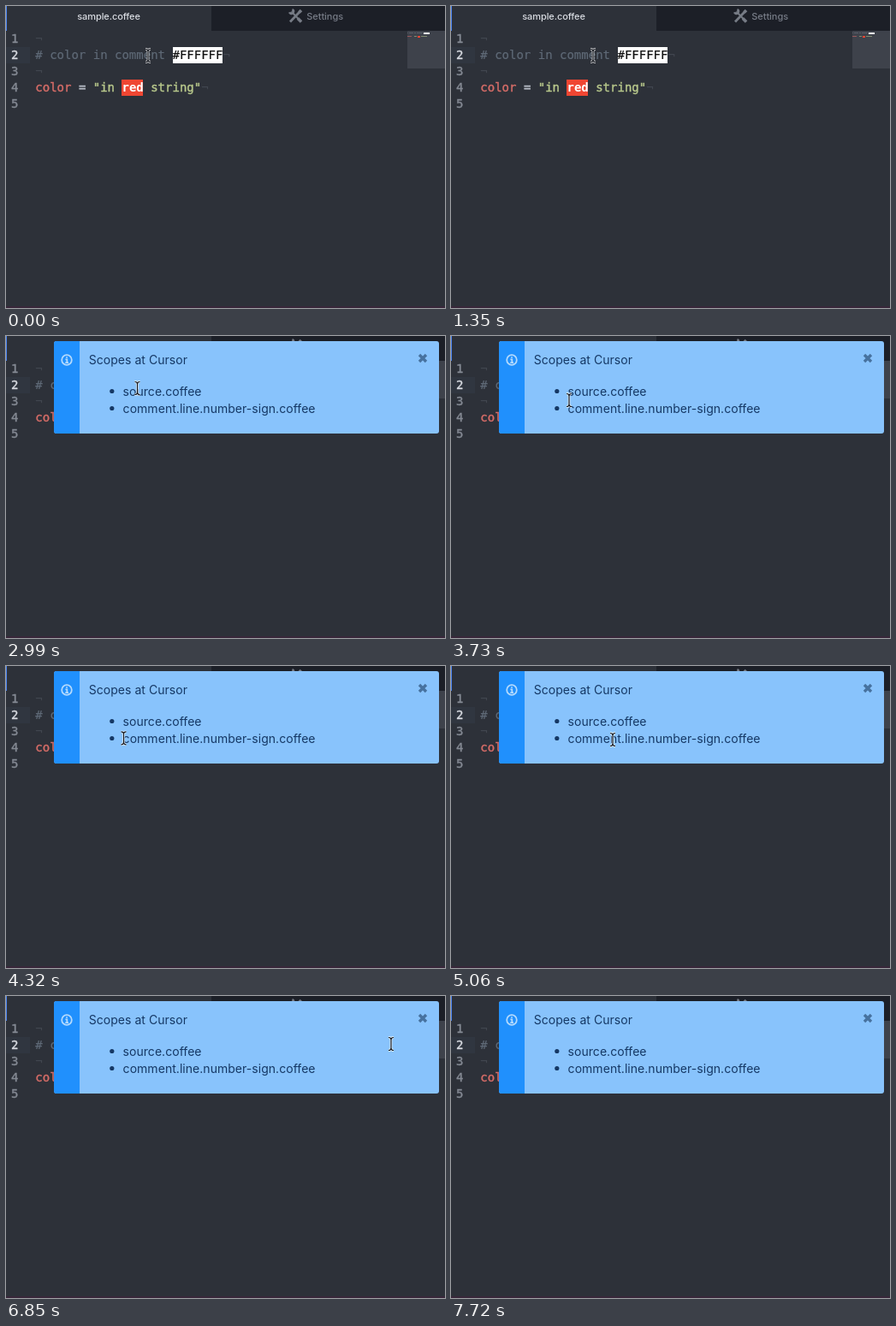
An HTML page with a canvas that plays this animation: 513x353 px, repeating every 7.85 s.

```html
<!DOCTYPE html>
<html lang="en">
<head>
<meta charset="utf-8">
<title>Scopes at Cursor</title>
<style>
  html, body { margin: 0; width: 100%; height: 100%; overflow: hidden; background: #2d3139; }
  canvas, svg { position: absolute; left: 0; top: 0; }
  #note {
    left: 56px; top: 6px; visibility: hidden;
    font: 14px Inter, "Open Sans", sans-serif; letter-spacing: .04px; fill: #153865;
  }
</style>
</head>
<body>
<canvas id="editor" width="513" height="353"></canvas>
<svg id="note" width="450" height="108" viewBox="0 0 450 108">
  <rect width="450" height="108" rx="3" fill="#88c3fc"/>
  <path d="M3 0H30V108H3a3 3 0 0 1-3-3V3a3 3 0 0 1 3-3z" fill="#2090fd"/>
  <g fill="none" stroke="#b4dafd" stroke-width="1.8">
    <circle cx="15" cy="22" r="5.8"/>
    <path d="M13.4 21.3H15.3V25.4M13.3 25.2H17M15 18.2V19.8"/>
  </g>
  <path d="M427 16l8 8m0-8l-8 8" stroke="#47729f" stroke-width="3.4"/>
  <text x="40.7" y="27">Scopes at Cursor</text>
  <circle cx="67.8" cy="58.5" r="2.6"/>
  <text x="80.6" y="63.5">source.coffee</text>
  <circle cx="67.8" cy="78.5" r="2.6"/>
  <text x="80.6" y="83.5">comment.line.number-sign.coffee</text>
</svg>
<canvas id="pointer" width="513" height="353"></canvas>
<script>
const LOOP = 7850, SHOW = 1800, SETTLE = 1950;
const LINE = 19, TOP = 29, LEFT = 34.3, CHAR = 8.43;
const MONO = '14px "DejaVu Sans Mono", monospace';
const UI = '500 11px Inter, "Open Sans", sans-serif';

// [start ms, step ms, pointer positions]
const MOVES = [
  [0, 0, [[166, 58]]],
  [SHOW, 0, [[165, 58]]],
  [2990, 147, [[153.5, 61], [143, 67], [138, 73], [136.5, 76]]],
  [3730, 147, [[138, 75], [140.5, 78], [139.5, 81], [138, 83.5], [137.5, 84.3]]],
  [4620, 147, [[144, 85.5], [158, 87], [174, 87], [189, 86], [196.5, 85]]],
  [6260, 148, [[238.5, 81], [305, 75], [380, 66], [450, 56], [503, 46], [530, 42]]]
];

const ctx = document.getElementById("editor").getContext("2d");
const over = document.getElementById("pointer").getContext("2d");
const note = document.getElementById("note");

function box(x, y, w, h, color) {
  ctx.fillStyle = color;
  ctx.fillRect(x, y, w, h);
}

function label(str, x, y, color, font, spacing = 0) {
  ctx.font = font;
  ctx.letterSpacing = spacing + "px";
  ctx.fillStyle = color;
  ctx.fillText(str, x, y);
}

// Editor text gets a thin outline for a slightly heavier weight.
function code(str, row, col, color, { bold = "", left = LEFT, heavy = .4 } = {}) {
  const x = left + col * CHAR, y = TOP + row * LINE - 5;
  label(str, x, y, color, bold + MONO);
  if (!heavy) return;
  ctx.lineWidth = heavy;
  ctx.strokeStyle = color;
  ctx.strokeText(str, x, y);
}

function toolsIcon() {
  ctx.save();
  ctx.translate(338.5, 11.5);
  ctx.strokeStyle = "#767b85";
  for (const [side, width] of [[1, 2.8], [-1, 2]]) {
    ctx.lineWidth = width;
    ctx.beginPath();
    ctx.moveTo(side * 5, -5);
    ctx.lineTo(side * -6.5, 7);
    ctx.stroke();
  }
  ctx.lineWidth = 2.6;
  ctx.beginPath();
  ctx.arc(-5, -5, 2.4, -1.2, 2.8);
  ctx.stroke();
  ctx.lineWidth = 3.6;
  ctx.beginPath();
  ctx.moveTo(2.5, 3);
  ctx.lineTo(6.5, 7);
  ctx.moveTo(4, -4);
  ctx.lineTo(6.5, -6.5);
  ctx.stroke();
  ctx.restore();
}

function drawTabs() {
  box(0, 0, 513, TOP, "#1c1f27");
  box(0, 0, 240, TOP, "#2d3139");
  box(0, 0, 1, TOP, "#4d86f5");
  label("sample.coffee", 83.3, 16, "#d9dce2", UI, -.1);
  label("Settings", 351.3, 16, "#777c87", UI, -.05);
  toolsIcon();
}

function drawMinimap() {
  box(469, TOP, 44, 44, "#3e424b");
  for (let i = 0; i < 18; i++) {
    if (![1, 7, 10].includes(i)) box(469 + i, 31, 1, 1, "#5a606b");
  }
  box(488, 31, 7, 2, "#fff");
  box(469, 35, 5, 1, "#96575a");
  box(477, 35, 3, 1, "#808b70");
  box(481, 35, 3, 2, "#f04632");
  box(485, 35, 7, 1, "#808b70");
}

function drawEditor(caretOn) {
  box(0, 0, 513, 353, "#2d3139");
  drawTabs();
  box(0, 48, 28, LINE, "rgba(153,187,255,.035)");
  for (let n = 1; n <= 5; n++) {
    code(String(n), n, 0, n === 2 ? "#d9dce2" : "#858a94", { left: 6 });
  }
  for (const [row, col] of [[1, 0], [2, 26], [3, 0], [4, 23]]) {
    code("¬", row, col, "#41464f", { heavy: 0 });
  }
  code("# color in comment", 2, 0, "#5f6a77", { heavy: .2 });
  box(195, 48, 58, LINE, "#fff");
  code("#FFFFFF", 2, 19, "#111", { heavy: .2 });
  code("color", 4, 0, "#d76d68");
  code("=", 4, 6, "#b5bac4");
  code('"in', 4, 8, "#b9c98c");
  box(135, 86, 25, LINE, "#f04632");
  code("red", 4, 12, "#fff", { bold: "bold ", heavy: 0 });
  code('string"', 4, 16, "#b9c98c");
  if (caretOn) box(169, 48, 1, LINE, "#5a8ff5");
  drawMinimap();
  box(0, 351, 513, 2, "#38273a");
}

function pointerAt(t) {
  const [start, step, spots] = MOVES.filter(m => m[0] <= t).pop();
  const i = step ? Math.floor((t - start) / step) : 0;
  return spots[Math.min(i, spots.length - 1)];
}

function drawPointer(t) {
  const [x, y] = pointerAt(t);
  over.clearRect(0, 0, 513, 353);
  over.beginPath();
  for (const side of [-1, 1]) {
    over.moveTo(x + side * 3, y - 7.5);
    over.quadraticCurveTo(x, y - 7.5, x, y - 5);
    over.lineTo(x, y + 5);
    over.quadraticCurveTo(x, y + 7.5, x + side * 3, y + 7.5);
  }
  over.lineWidth = 2.8;
  over.strokeStyle = "rgba(255,255,255,.75)";
  over.stroke();
  over.lineWidth = 1.2;
  over.strokeStyle = "#14181f";
  over.stroke();
}

function frame(now) {
  const t = now % LOOP;
  drawEditor((t >= 150 && t < 600) || (t >= 1050 && t < 1350));
  note.style.visibility = t >= SHOW ? "visible" : "hidden";
  note.style.transform = t < SETTLE
    ? "perspective(450px) translateY(2.6px) rotateX(-7.4deg)" : "none";
  drawPointer(t);
  requestAnimationFrame(frame);
}

frame(0);
</script>
</body>
</html>
```
